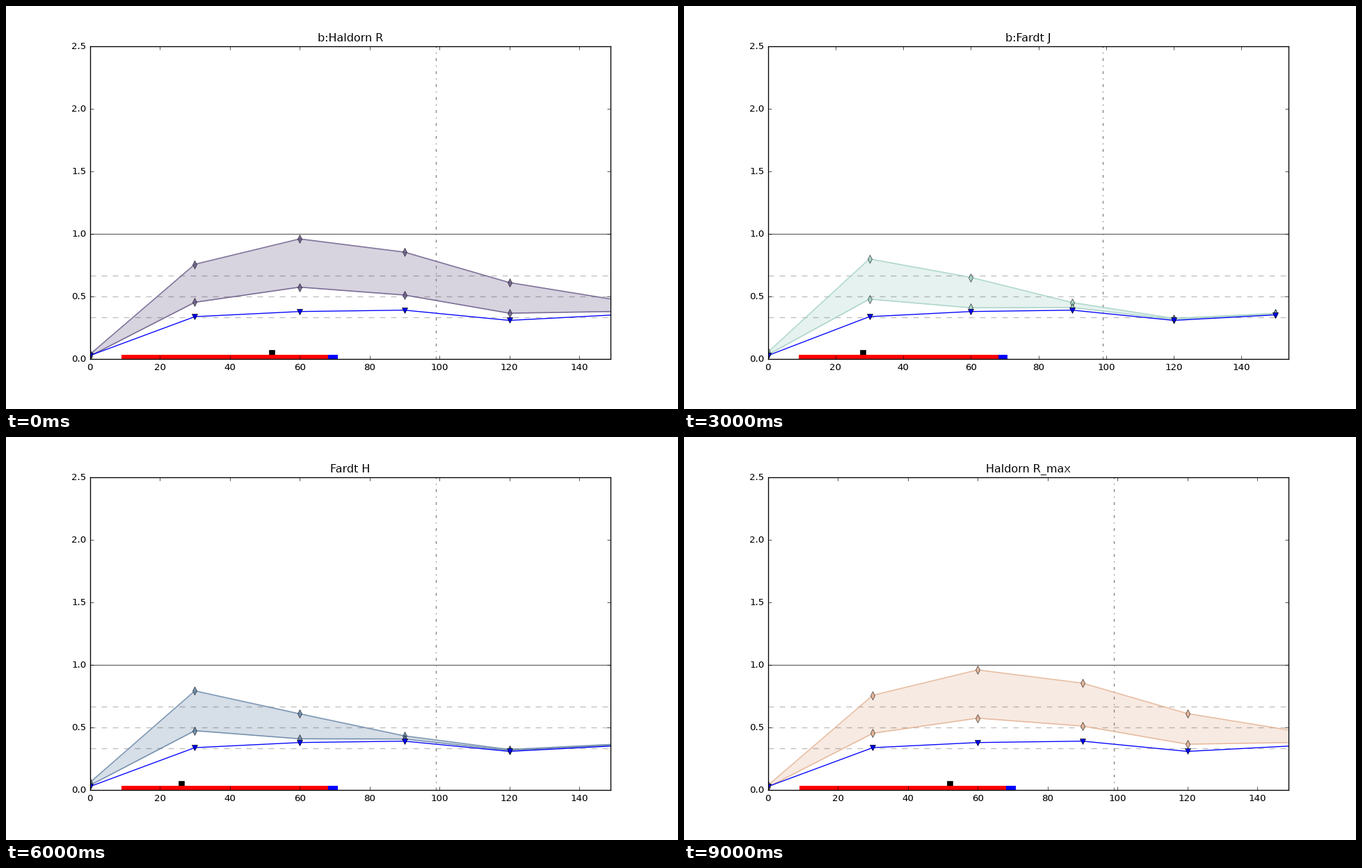
These frames come from a looping animation (966 by 580 pixels, 10000 ms). A matplotlib script:

```python
import matplotlib.pyplot as plt
import numpy as np
from matplotlib.animation import FuncAnimation
from matplotlib.patches import Rectangle

plt.style.use("classic")
plt.rcParams.update({
    "font.family": "DejaVu Sans",
    "font.size": 10,
    "text.hinting": "native",
    "figure.dpi": 96,
    "savefig.dpi": "figure",
    "figure.facecolor": "white",
    "savefig.facecolor": "white",
})

W, H, DPI = 966, 580, 96
RADII = np.arange(0, 151, 30)
HALO = np.array([0.025, 0.336, 0.377, 0.388, 0.306, 0.350])

# title, colour, disc size, disc strength, speed at the centre
MODELS = [
    ("b:Haldorn R", "#635383", 52, 0.88, 0.024),
    ("b:Haldorn B", "#374773", 57.5, 0.89, 0.020),
    ("b:Galmez-Oruna J", "#b7dbcb", 25.7, 0.71, 0.052),
    ("b:Fardt J", "#9fcfc3", 28, 0.73, 0.046),
    ("Fardt J", "#83bfbf", 30.5, 0.75, 0.041),
    ("Fardt K", "#6f9fb3", 28, 0.73, 0.046),
    ("Fardt H", "#5f7fa3", 26.1, 0.715, 0.052),
    ("S4G_AM", "#5f87c3", 17.5, 0.57, 0.118),
    ("S4G_AM 2d", "royalblue", 17.5, 0.57, 0.118),
    ("Haldorn R_max", "#e3af8f", 52, 0.88, 0.024),
]
TWO_DISCS = {"S4G_AM": [47], "S4G_AM 2d": [11.7, 47]}
WIDE = "b:Fardt J"

fig = plt.figure(figsize=(W / DPI, H / DPI), dpi=DPI)
ax = fig.add_axes([0.125, 0.125, 0.775, 0.775])


def rotation_band(size, strength, centre):
    """Upper and lower rotation curves: a disc added to the halo."""
    t = RADII / (1.09 * size + 3.5)
    disc = strength * t * np.exp((1 - t ** 1.5) / 1.5)
    upper = np.sqrt(HALO ** 2 + disc ** 2 + (centre + 0.0003 * RADII) ** 2)
    floor = HALO + 0.03 * (1 - np.exp((HALO - upper) / 0.05))
    lower = np.maximum(0.597 * upper, floor * (RADII > 0))
    return upper, lower


def draw_guides():
    ax.axhline(1, color="0.42", lw=1)
    for level in (1 / 3, 1 / 2, 2 / 3):
        ax.axhline(level, color="black", alpha=0.25, ls="--", lw=1)
    ax.axvline(99, color="gray", ls="-.", lw=1)


def draw_range(start, end, color):
    ax.add_patch(Rectangle((start, 0), end - start, 0.028,
                           facecolor=color, lw=0, zorder=2.5))


def draw_band(band, color):
    ax.fill_between(RADII, *band, color=color, alpha=0.25, lw=0)
    for curve in band:
        ax.plot(RADII, curve, "-d", color=color, alpha=0.8, lw=1.25,
                mec="black")


def update(i):
    title, color, size, strength, centre = MODELS[i]
    marks = TWO_DISCS.get(title, [size])
    ax.clear()
    draw_guides()
    draw_band(rotation_band(size, strength, centre), color)
    ax.plot(RADII, HALO, "-v", color="blue", mec="black")
    draw_range(9, 68.1, "red")
    draw_range(68.1, 70.9, "blue")
    ax.plot(marks, [0.05] * len(marks), "s", color="black")
    ax.set_xlim(0, 154 if title == WIDE else 149)
    ax.set_ylim(0, 2.5)
    ax.set_xticks(range(0, 141, 20))
    ax.set_yticks(np.arange(0, 2.6, 0.5))
    ax.set_title(title)
    return []


anim = FuncAnimation(fig, update, frames=len(MODELS), interval=1000,
                     init_func=lambda: update(0), repeat=True)
plt.show()
```
